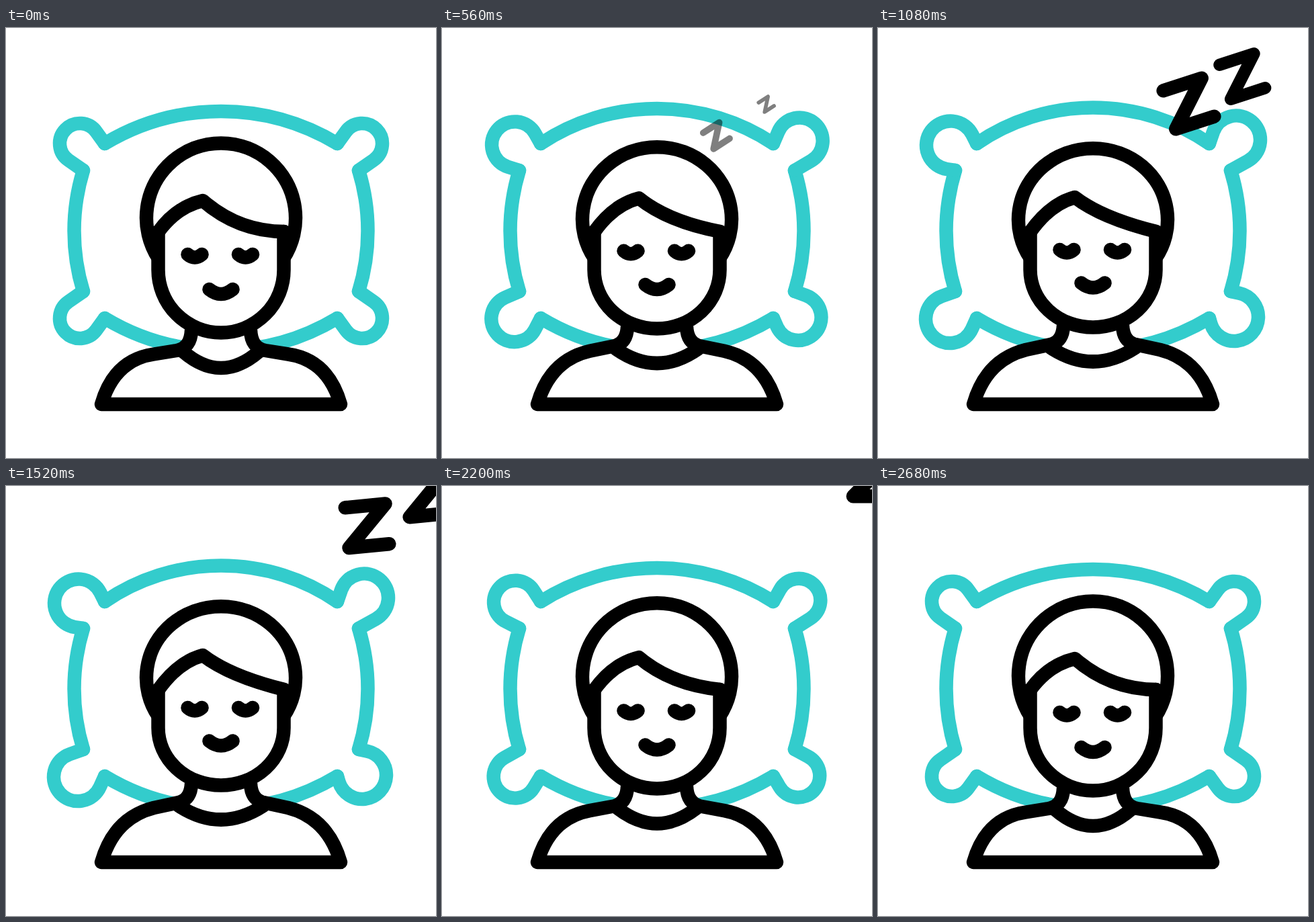
Animation of 640 by 640 pixels, one loop 3000 ms. Source, as an HTML page:

```html
<!DOCTYPE html>
<html lang="en">
<head>
<meta charset="utf-8">
<title>Sleeping</title>
<style>
  html, body { margin: 0; width: 100%; height: 100%; overflow: hidden; background: #fff; }
  svg { display: block; width: 100vw; height: 100vh; }
  path { fill: none; stroke: #000; stroke-width: 20.5; stroke-linecap: round; stroke-linejoin: round; }
  #pillow path { stroke: #3cc; }
  #body, #face { fill: #fff; }
</style>
</head>
<body>
<svg viewBox="0 0 640 640">
  <g id="pillow"><path id="edges"/></g>
  <path id="body"/>
  <path id="collar"/>
  <path id="hair"/>
  <path id="face"/>
  <path id="features"/>
  <g id="snore"></g>
</svg>
<script>
const LOOP = 3000, STEP = 40;
const $ = id => document.getElementById(id);
const clamp = x => Math.min(1, Math.max(0, x));
const ease = x => { x = clamp(x); return x * x * (3 - 2 * x); };
const lerp = (a, b, p) => a + (b - a) * p;

const shape = (el, d) => el.setAttribute('d', d);
const addPath = parent => $(parent).appendChild(document.createElementNS('http://www.w3.org/2000/svg', 'path'));

// Circular arc between two points, bulging by the given depth
function bow(x1, y1, x2, y2, depth) {
  const half = Math.hypot(x2 - x1, y2 - y1) / 2;
  const r = (half * half + depth * depth) / (2 * depth);
  return `M${x1} ${y1}A${r} ${r} 0 0 1 ${x2} ${y2}`;
}

// Two tangents from the pillow's corner joints, wrapped around a circle
function earPath(cx, cy, r) {
  const touch = (x, y, side) => {
    const dx = x - cx, dy = y - cy;
    const a = Math.atan2(dy, dx) + side * Math.acos(Math.min(1, r / Math.hypot(dx, dy)));
    return `${cx + r * Math.cos(a)} ${cy + r * Math.sin(a)}`;
  };
  return `M115 212L${touch(115, 212, 1)}A${r} ${r} 0 1 1 ${touch(147, 172, -1)}L147 172`;
}

// Centre of each ear when the pillow is fully puffed, in top-left terms
const ears = [
  { x: 108, y: 174.5 },
  { x: 107, y: 166.5, right: true },
  { x: 107, y: 171, low: true },
  { x: 110, y: 174, right: true, low: true }
];
for (const e of ears) {
  e.el = addPath('pillow');
  e.el.setAttribute('transform',
    `translate(${e.right ? 640 : 0} ${e.low ? 604 : 0}) scale(${e.right ? -1 : 1} ${e.low ? -1 : 1})`);
}

function drawPillow(p) {
  shape($('edges'), bow(147, 172, 493, 172, lerp(48, 53.5, p)) + bow(525, 212, 525, 392, 13.5)
    + bow(493, 432, 147, 432, 48) + bow(115, 392, 115, 212, 13.5));
  for (const e of ears) shape(e.el, earPath(lerp(110, e.x, p), lerp(172, e.y, p), lerp(30, 36, p)));
}

function drawPerson(p) {
  const k = (a, b) => lerp(a, b, p);

  const neck = k(450, 443), bend = k(476, 465), base = k(480, 470.5), shoulder = k(485.5, 479);
  const inset = k(254, 259);
  shape($('body'), `M276 ${neck}Q275 ${bend} ${inset} ${base}L220 ${shoulder}Q161 494 142 560
    H498Q479 494 420 ${shoulder}L${640 - inset} ${base}Q365 ${bend} 364 ${neck}`);

  const cx = k(264, 257), cy = k(482, 476);
  shape($('collar'), `M${cx} ${cy}Q320 ${k(530, 517)} ${640 - cx} ${cy}`);

  shape($('hair'), `M227 343A111 ${k(111, 106)} 0 1 1 413 343`);
  shape($('face'), `M226.5 303V360A93.5 ${k(93.5, 85.5)} 0 0 0 413.5 360V303`);

  const fringe = `M227 303Q${k(254, 256)} ${k(266, 262)} 293 ${k(257, 252)}Q${k(346, 333)} ${k(303, 283)} 414 303`;
  const smile = (x, y, width, sag) => `M${x} ${y}q${width / 2} ${sag} ${width} 0`;
  const eyes = k(337, 330);
  shape($('features'), fringe + smile(270.5, eyes, 21, 9) + smile(346, eyes, 21, 9)
    + smile(302.5, k(389, 379.5), 35, 14));
}

// Each Z swells out of its root while drifting up and to the right
const zs = [
  { root: [439.5, 146.6], mid: [462.5, 112.5], speed: [0.1705, -0.121], grow: 490 },
  { root: [493.7, 106.3], mid: [548, 68], speed: [0.181, -0.124], grow: 840 }
];
for (const z of zs) {
  z.el = addPath('snore');
  shape(z.el, 'M-30 -30H30L-30 30H30');
}

function drawSnore(t) {
  const drift = t - 1080 - 0.1 * Math.max(0, t - 1520);
  const angle = Math.min(0, -27.2 + 0.0285 * (t - 760));
  for (const { el, root, mid, speed, grow } of zs) {
    const s = clamp((t - 328) / grow);
    const [x, y] = root.map((r, i) => lerp(r, mid[i] + speed[i] * drift, s));
    el.setAttribute('transform', `translate(${x} ${y}) rotate(${angle}) scale(${s})`);
    el.setAttribute('opacity', s > 0 ? clamp((t - 200) / 720) : 0);
  }
}

function draw(t) {
  const breath = ease((t - 160) / 600) - ease((t - 1520) / 1160);
  drawPillow(breath);
  drawPerson(breath);
  drawSnore(t);
}

const begin = performance.now();
function tick() {
  const t = (performance.now() - begin) % LOOP;
  draw(Math.floor(t / STEP) * STEP);
  requestAnimationFrame(tick);
}
tick();
</script>
</body>
</html>
```
